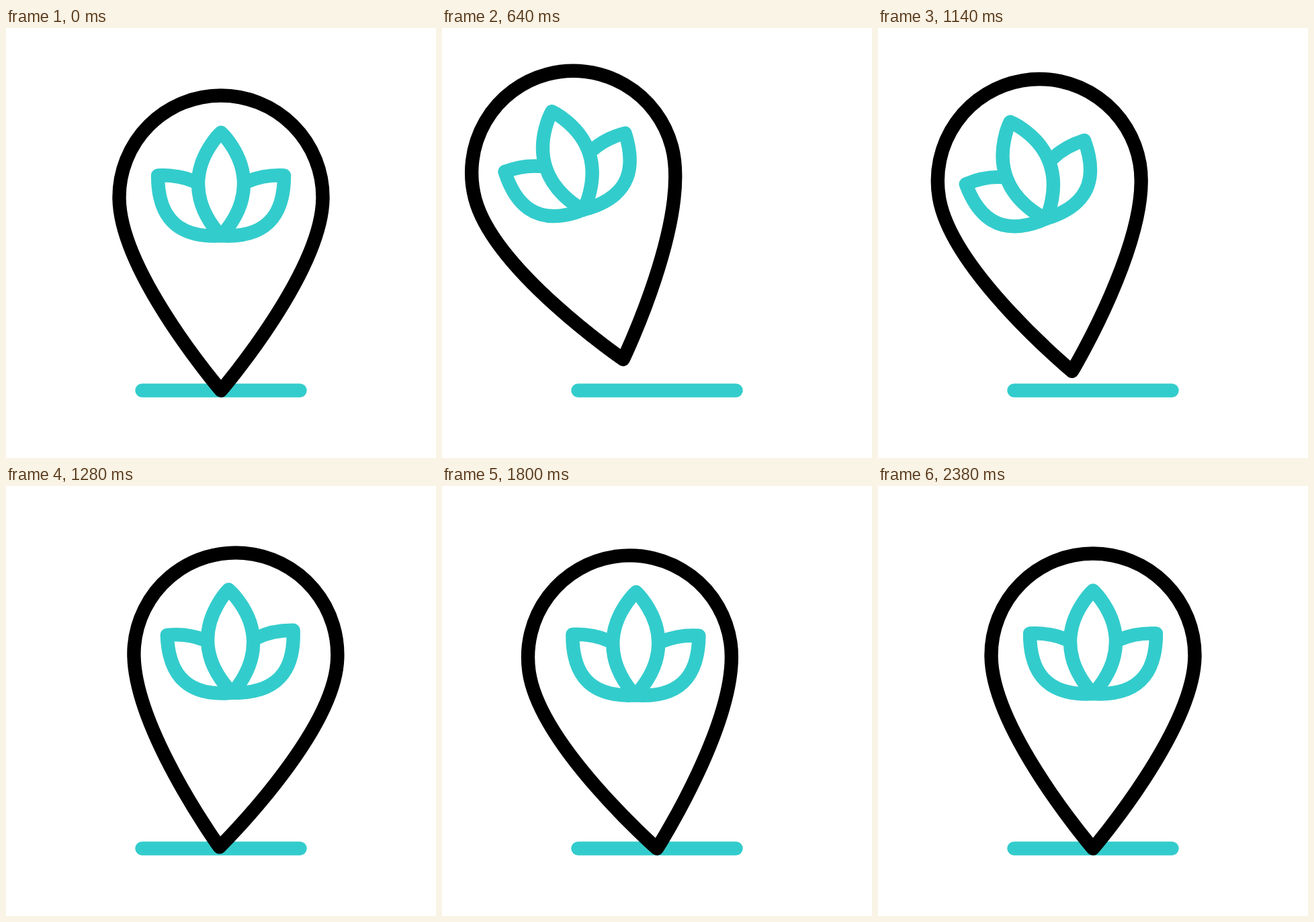
An HTML page that plays this animation: 640x640 px, repeating every 2.4 s.

```html
<!DOCTYPE html>
<html lang="en">
<head>
<meta charset="utf-8">
<title>Lotus pin</title>
<style>
  html, body { margin: 0; height: 100%; overflow: hidden; background: #fff; }
  svg { display: block; width: 100vw; height: 100vh; }
  path { fill: none; stroke: #3cc; stroke-width: 20.4; stroke-linecap: round; stroke-linejoin: round; }
  .outline { stroke: #000; }
</style>
</head>
<body>
<svg viewBox="0 0 640 640">
  <path d="M202.5 539.5H437.5"/>
  <g id="pin">
    <path class="outline" d="M320 539.5C320 539.5 168.5 363 168.5 252A151.5 151.5 0 0 1 471.5 252C471.5 363 320 539.5 320 539.5Z"/>
    <g id="lotus">
      <path d="M320 155.5C320 155.5 286 187 286 232S320 309 320 309S354 277 354 232S320 155.5 320 155.5Z"/>
      <path d="M280 228.5Q256 218 226 219.5C226 270 245 309.5 310 309.5L320 309"/>
      <path d="M360 228.5Q384 218 414 219.5C414 270 395 309.5 330 309.5L320 309"/>
    </g>
  </g>
</svg>
<script>
const LOOP = 2400;
const pin = document.getElementById('pin');
const lotus = document.getElementById('lotus');

// Keys are [time in ms, value]
const lift = [[0, 0], [935, 1], [943, 1], [1338, 0]];
const lean = [[0, 0], [935, -18.5], [943, -18.5], [1478, 13.5], [1876, -9.6], [2230, 0]];
const sway = [[400, 0], [1067, -11], [1733, 8.8], [2400, 0]];

// Symmetric ease, cubic-bezier(.455, 0, .545, 1)
function ease(x) {
  let low = 0, high = 1;
  for (let i = 0; i < 24; i++) {
    const t = (low + high) / 2, u = 1 - t;
    const at = 3 * t * u * u * 0.455 + 3 * t * t * u * 0.545 + t * t * t;
    if (at < x) low = t; else high = t;
  }
  return low * low * (3 - 2 * low);
}

function valueAt(keys, time) {
  const next = keys.findIndex(key => key[0] > time);
  if (next === 0) return keys[0][1];
  if (next < 0) return keys[keys.length - 1][1];
  const [t0, v0] = keys[next - 1], [t1, v1] = keys[next];
  return v0 + (v1 - v0) * ease((time - t0) / (t1 - t0));
}

function draw() {
  const time = performance.now() % LOOP;
  const up = valueAt(lift, time);
  pin.setAttribute('transform',
    `translate(${-62.5 * up} ${-57.5 * up}) rotate(${valueAt(lean, time)} 320 539.5)`);
  lotus.setAttribute('transform', `rotate(${valueAt(sway, time)} 320 309)`);
  requestAnimationFrame(draw);
}
draw();
</script>
</body>
</html>
```
